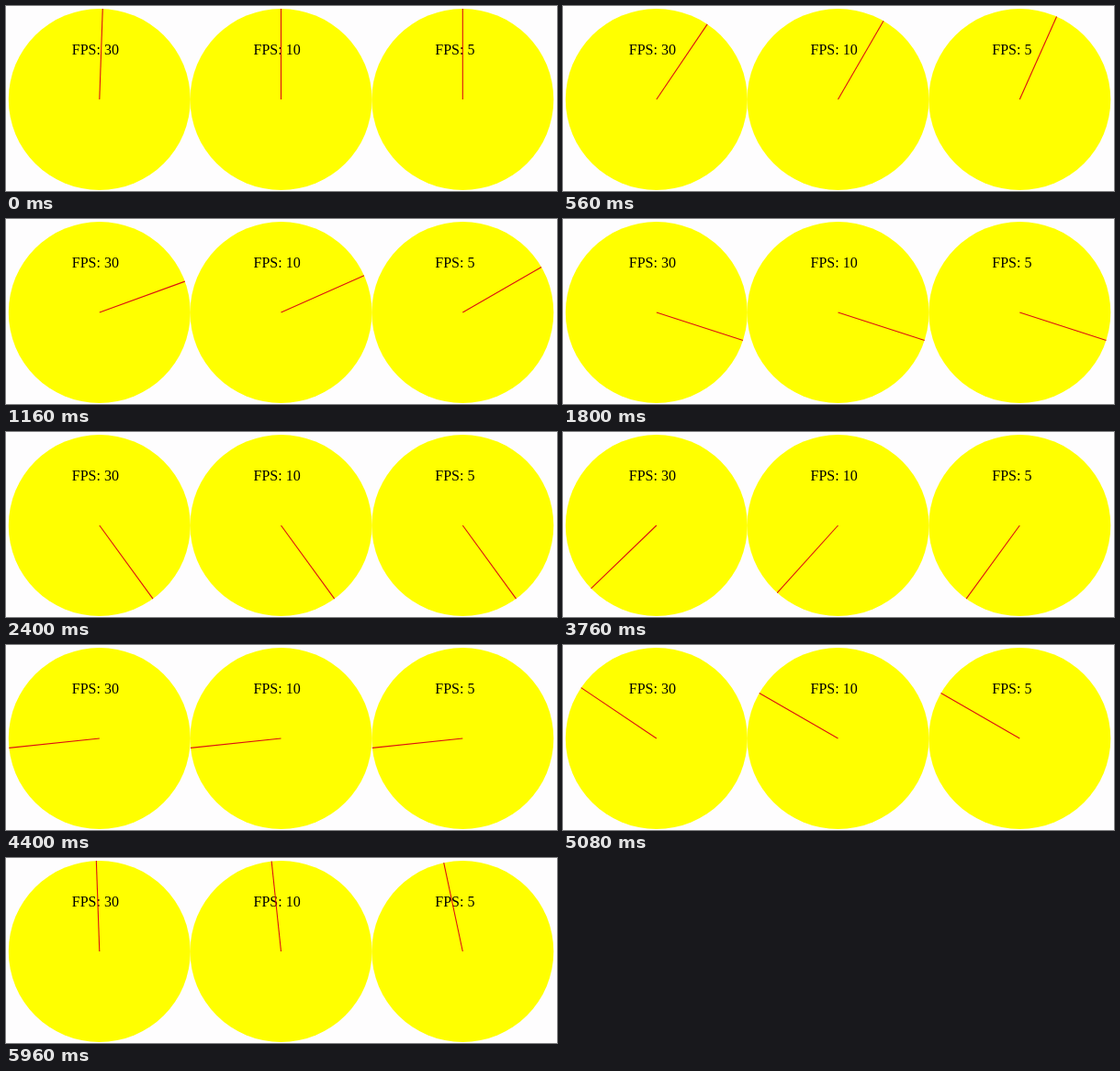
Recreate the animation shown at these times as an HTML page with a canvas. Size 600 by 202 pixels, loop 6000 ms.

```html
<!DOCTYPE html>
<html lang="en">
<head>
<meta charset="utf-8">
<title>Frame rate dials</title>
<style>
  html, body { margin: 0; width: 600px; height: 202px; overflow: hidden; background: #fefdfe; }
  canvas { display: block; }
</style>
</head>
<body>
<canvas id="stage" width="600" height="202"></canvas>
<script>
const ctx = document.getElementById('stage').getContext('2d');
const LOOP = 6000, TICK = 40, RADIUS = 99, CY = 102;
const dials = [
  { x: 101.8, fps: 30 },
  { x: 299.5, fps: 10 },
  { x: 497.3, fps: 5 }
];

function drawDial({ x, fps }, step) {
  // Slower dials hold their hand for several 30 fps steps.
  const hold = 30 / fps;
  const angle = Math.floor(step / hold) * hold * Math.PI / 90;

  ctx.fillStyle = '#ff0';
  ctx.beginPath();
  ctx.arc(x, CY, RADIUS, 0, 2 * Math.PI);
  ctx.fill();

  ctx.fillStyle = '#000';
  ctx.fillText('FPS: ' + fps, x - 30, 53);

  ctx.strokeStyle = '#dc1010';
  ctx.lineWidth = 1.1;
  ctx.beginPath();
  ctx.moveTo(x, CY);
  ctx.lineTo(x + RADIUS * Math.sin(angle), CY - RADIUS * Math.cos(angle));
  ctx.stroke();
}

function draw(time) {
  const tick = Math.floor((time % LOOP) / TICK);
  const step = Math.max(1, Math.round(tick * TICK * 30 / 1000));
  ctx.clearRect(0, 0, 600, 202);
  ctx.font = '16px "Liberation Serif", serif';
  for (const dial of dials) drawDial(dial, step);
}

const start = performance.now();
function loop() {
  draw(performance.now() - start);
  requestAnimationFrame(loop);
}
loop();
</script>
</body>
</html>
```
